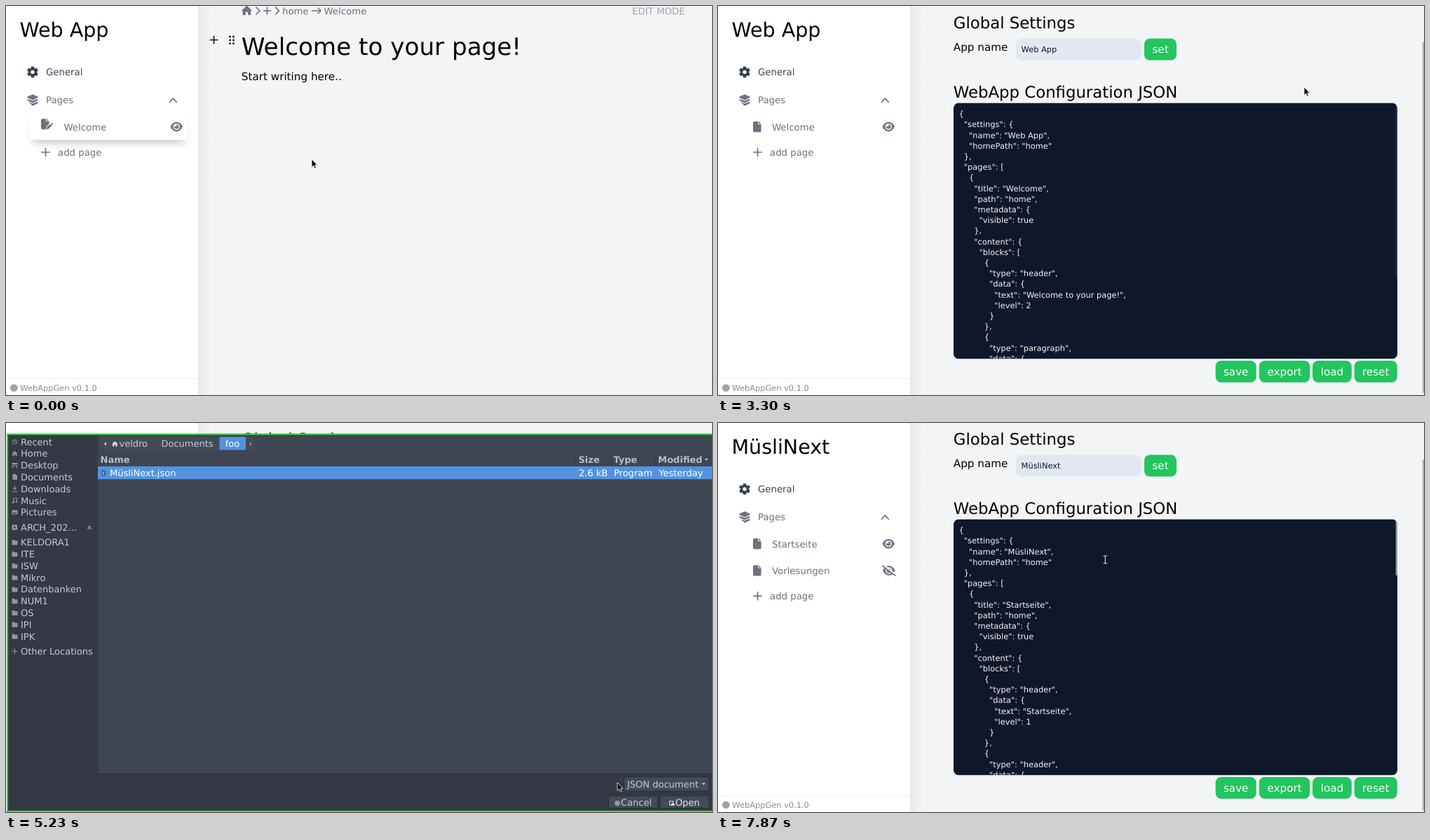
Animation, 1007 px wide and 556 px high, one loop 8000 ms. Source, as an HTML page:

```html
<!DOCTYPE html>
<html lang="en">
<head>
<meta charset="utf-8">
<title>Web App editor</title>
<style>
  html, body { margin: 0; width: 100%; height: 100%; overflow: hidden; background: #f3f4f6; }
  svg { display: block; }
  text { font-family: "DejaVu Sans", Verdana, sans-serif; text-rendering: geometricPrecision; white-space: pre; }
  .shade { filter: drop-shadow(0 6px 6px rgba(0, 0, 0, .2)); }
  .glow { filter: drop-shadow(0 4px 4px rgba(0, 0, 0, .18)); }
</style>
</head>
<body>
<svg id="stage" width="1007" height="556" viewBox="0 0 1007 556"></svg>
<script>
const LOOP = 8000;
const INK = '#374151', GRAY = '#6b7280', PALE = '#9ca3af', GREEN = '#22c55e', NIGHT = '#0f172a', BLUE = '#5294e2';

const text = (x, y, str, size = 13.3, fill = GRAY, extra = '') =>
  `<text x="${x}" y="${y}" font-size="${size}" fill="${fill}" ${extra}>${str}</text>`;
const rect = (x, y, w, h, fill, r = 0, extra = '') =>
  `<rect x="${x}" y="${y}" width="${w}" height="${h}" rx="${r}" fill="${fill}" ${extra}/>`;
const path = (d, fill = GRAY, extra = '') => `<path d="${d}" fill="${fill}" ${extra}/>`;
const line = (d, color = GRAY, width = 1.7) =>
  path(d, 'none', `stroke="${color}" stroke-width="${width}" stroke-linecap="round" stroke-linejoin="round"`);
const at = (x, y, body, extra = '') => `<g transform="translate(${x} ${y})" ${extra}>${body}</g>`;
const plus = (x, y, r, color, width) => line(`M${x - r} ${y}h${2 * r}M${x} ${y - r}v${2 * r}`, color, width);

// Icons
const tooth = a => rect(-2.4, -8, 4.8, 16, INK, 1.3, `transform="rotate(${a})"`);
const gear = [0, 60, 120].map(tooth).join('') +
  `<circle r="6" fill="${INK}"/><circle r="2.6" fill="#fff"/>`;
const layers = path('M8 0 15.6 3.5Q16.4 4 15.6 4.6L8 8.1.4 4.6Q-.4 4 .4 3.5Z') +
  [6.9, 10.8].map(y => path(`M2 ${y} 8 ${y + 2.4} 14 ${y} 15.6 ${y + .8}Q16.4 ${y + 1.3} 15.6 ${y + 1.8}L8 ${y + 5.2}.4 ${y + 1.8}Q-.4 ${y + 1.3} .4 ${y + .8}Z`)).join('');
const file = path('M2 0H7V3.9H11.6V13.4Q11.6 15.3 9.7 15.3H2Q0 15.3 0 13.4V2Q0 0 2 0Z') + path('M7.8 0 11.6 3.1H7.8Z');
const filePen = path('M2 0H7V3.9H11.6V7.2L7.6 11.2 6.8 15.3H2Q0 15.3 0 13.4V2Q0 0 2 0Z') + path('M7.8 0 11.6 3.1H7.8Z') +
  path('M8.4 12 13.2 7.2 15.6 9.6 10.8 14.4 7.8 15.2Z') + path('M13.9 6.5 15 5.5 17.4 7.8 16.3 8.9Z');
const eye = path('M0 7Q3 .2 8.7 .2T17.4 7Q14.4 13.8 8.7 13.8T0 7Z') +
  '<circle cx="8.7" cy="7" r="4.7" fill="#fff"/>' + `<circle cx="8.7" cy="7" r="3.2" fill="${GRAY}"/>` +
  '<circle cx="7.5" cy="5.7" r="1.3" fill="#fff"/>';
const eyeOff = at(.6, 0, eye) + line('M1.2 -1.2 19 13', '#fff', 2) + line('M.2 .2 18.2 14.3', GRAY, 1.6);
const house = (color, scale) => path('M8 0 16 7.2H14V14H9.8V9.5H6.2V14H2V7.2H0Z', color, `transform="scale(${scale})"`);

function sidebar(title, pages, active) {
  const rows = pages.map(([label, shown], i) => {
    const y = 173 + i * 38.3;
    const icon = active ? at(50, 165, filePen, 'id="pen"') : at(50, y - 8, file);
    return icon + text(active ? 82.5 : 77, y + 4.9, label) +
      at(234.5, y - 7.4, shown ? eye : eyeOff);
  }).join('');
  const addY = 209 + (pages.length - 1) * 38.3;
  return rect(274, 0, 22, 556, 'url(#edge)') + rect(0, 0, 274, 556, '#fff') +
    text(19.5, 44, title, 28.5, '#000') +
    at(38, 94.4, gear, 'class="gear"') + text(57, 99.2, 'General', 13.3, INK) +
    at(30, 126.3, layers) + text(57, 139.2, 'Pages') + line('M233.2 137.5 238.3 132.2 243.4 137.5') +
    (active ? rect(38, 158, 217, 32, '#fff', 3, 'class="shade"') + rect(34, 154, 225, 37.3, '#fff', 4) : '') +
    rows + plus(56.5, addY, 5.6) + text(74, addY + 4.9, 'add page') +
    rect(0, 532, 274, 1, '#eceef1') +
    `<circle cx="11.3" cy="545.8" r="5.4" fill="${PALE}"/>` + text(20.3, 550, 'WebAppGen v0.1.0', 11.4, '#858b97');
}

function welcomePage() {
  const dots = [0, 1, 2, 3, 4, 5].map(i => rect(318.2 + i % 2 * 5, 42.6 + (i >> 1) * 4.8, 2.6, 2.6, '#111', .6)).join('');
  return at(335.7, -.5, house(GRAY, .96)) + line('M357 2 362 6.8 357 11.6M384.5 2 389.5 6.8 384.5 11.6') +
    plus(372.5, 6.8, 4.8) + text(394, 11.7, 'home') + line('M436.5 6.8H449M445 2.8 449 6.8 445 10.8', GRAY, 1.5) +
    text(453.5, 11.7, 'Welcome') + text(893, 11.7, 'EDIT MODE', 13.3, PALE) +
    plus(296.5, 48.5, 5.3, '#111', 1.6) + dots +
    text(335.8, 70.3, 'Welcome to your page!', 34.2, '#000') + text(335.8, 106, 'Start writing here..', 15.2, '#000');
}

function config(name, title, heading, level, next) {
  const block = (type, data) => ({ type, data });
  return JSON.stringify({
    settings: { name, homePath: 'home' },
    pages: [{ title, path: 'home', metadata: { visible: true },
      content: { blocks: [block('header', { text: heading, level }), block(next, { text: '' })] } }]
  }, null, 2).split('\n').slice(0, 24);
}

const button = (x, y, w, label, cls = '') =>
  rect(x, y, w, 31, GREEN, 8, `class="${cls}"`) + text(x + w / 2, y + 20.8, label, 15.2, '#f9fafb', 'text-anchor="middle"');

function settingsPage(name, lines, thumb) {
  const code = lines.map((row, i) => {
    const body = row.trimStart();
    return text((343.6 + (row.length - body.length) * 3.625).toFixed(2), (219.2 + i * 15.2).toFixed(1), body, 11.4, '#f3f4f6');
  }).join('');
  return '<g class="scroll">' + text(335.8, 39.5, 'General', 34.2, '#000') +
    text(335.8, 93, 'Global Settings', 22.8, '#000') + text(335.8, 124.6, 'App name', 15.2, '#000') +
    rect(425, 107.6, 179, 30.8, '#e2e8f0', 8) + text(432.6, 127.2, name, 11.4, NIGHT) +
    button(608, 107.5, 46, 'set') + text(335.8, 192, 'WebApp Configuration JSON', 22.8, '#000') +
    '<g clip-path="url(#code)">' + rect(336, 199.5, 633, 366, NIGHT) + code +
    rect(966.8, 201, 2, thumb, '#a9b0bd', 1, 'class="thumb"') + '</g>' +
    button(709.7, 568, 58, 'save') + button(771.8, 568, 72.5, 'export') +
    button(848, 568, 55.8, 'load', 'load') + button(907.5, 568, 61.3, 'reset') + '</g>' +
    rect(1004.8, 0, 2.2, 502, '#b4b5b9', 1, 'class="bar"');
}

function dialog() {
  const SOFT = '#c3c9d4', DIM = '#8f96a3', PANEL = '#353945', BTN = '#444a58', EDGE = '#2b2e39';
  const t = (x, mid, str, fill = SOFT, extra) => text(x, mid + 4.7, str, 13, fill, extra);
  const bold = (x, str) => t(x, 52, str, '#b4bcc9', 'font-weight="bold"');
  const folder = y => path(`M8.5 ${y - 3.5}h3l1 1.2h4v6h-8z`, DIM);
  const thin = d => line(d, DIM, 1.2);
  const places = ['Recent', 'Home', 'Desktop', 'Documents', 'Downloads', 'Music', 'Pictures'];
  const drives = ['KELDORA1', 'ITE', 'ISW', 'Mikro', 'Datenbanken', 'NUM1', 'OS', 'IPI', 'IPK'];
  const icons = [
    '<circle cx="12.5" cy="27" r="3.4" fill="none" stroke="#8f96a3"/>' + thin('M12.5 25v2h1.5'),
    at(8.5, 40, house(DIM, .5)),
    rect(8.5, 57, 8, 2.2, DIM) + thin('M9 61h7M9.5 61v3M15.5 61v3'),
    path('M9.5 73h4l2.5 2.5v5.5h-6.5z', DIM),
    thin('M12.5 90v5M10.5 93.2l2 2 2-2M9 98h7'),
    thin('M10.8 113.5v-6h4.7v5') + `<circle cx="10" cy="113.6" r="1.4" fill="${DIM}"/><circle cx="14.7" cy="112.8" r="1.4" fill="${DIM}"/>`,
    rect(8.5, 124.5, 8, 6.5, DIM, 1) + path('M9.5 130l2-3 1.5 2 1-1 1.5 2z', PANEL)
  ].join('');
  return rect(2, 16, 1010, 539, '#404552') + rect(3, 17, 128, 485, PANEL) +
    places.map((p, i) => t(21, 27 + i * 16.77, p)).join('') + icons +
    rect(8.5, 145.5, 7.5, 7.5, DIM, 1) + rect(11, 148, 2.5, 2.5, PANEL) + t(21, 149.2, 'ARCH_202…') +
    path('M116 149.5l3-3.2 3 3.2zM116 150.5h6v1.2h-6z', DIM) +
    drives.map((d, i) => folder(170.5 + i * 16.8) + t(21, 170.5 + i * 16.8, d)).join('') +
    plus(12.5, 326.3, 3.6, DIM, 1.1) + t(21, 326.5, 'Other Locations') +
    rect(134.5, 20.5, 220, 18, BTN, 2) + rect(304.5, 20, 37.5, 18.5, BLUE, 1) +
    path('M143 27v5.5l-3.2-2.7z', SOFT) + at(151, 26, house('#d3dae3', .54)) +
    t(161.5, 29.6, 'veldro') + t(221.5, 29.6, 'Documents') + t(312.8, 29.6, 'foo', '#fff') + path('M347.5 27v5.5l3-2.7z', DIM) +
    bold(134.5, 'Name') + bold(816.5, 'Size') + bold(866.5, 'Type') + bold(930, 'Modified') +
    path('M996.5 51h5l-2.5 2.8z', SOFT) + [811, 862.5, 925.5].map(x => rect(x, 44, 1, 17, '#363b47')).join('') +
    rect(131, 62, 876, 18.3, BLUE) + path('M136.5 67h4l2 2v6.5h-6z', '#3569a8') + rect(138.5, 70, 1.2, 4, '#b8d3f3') +
    t(148, 71, 'MüsliNext.json', '#fff') + t(817, 71, '2.6 kB', '#fff') + t(867, 71, 'Program', '#fff') + t(931, 71, 'Yesterday', '#fff') +
    rect(3, 501, 1004, 53, PANEL) + rect(3, 501, 1004, 1, EDGE) + rect(3, 529, 1004, 1, '#2f333e') +
    rect(881.5, 506, 121, 20, BTN, 2, `stroke="${EDGE}"`) + t(886, 515.8, 'JSON document') + path('M992.3 514.5h5.4l-2.7 3z', SOFT) +
    rect(859.5, 533, 70, 17.5, BTN, 2, `stroke="${EDGE}"`) + t(877, 542, 'Cancel') +
    '<circle cx="872" cy="543.5" r="3.2" fill="none" stroke="#d3dae3"/><circle cx="872" cy="543.5" r="1.6" fill="#d3dae3"/>' +
    rect(933, 533, 70, 17.5, BTN, 2, `id="open" stroke="${EDGE}"`) + t(954.8, 542, 'Open', '#dfe4ec') +
    rect(946.5, 540.5, 5, 5.5, 'none', 0, 'stroke="#d3dae3"') + rect(949, 543.5, 4.5, 3.5, '#d3dae3') +
    rect(2, 16, 1020, 539, 'none', 0, 'stroke="#3fcf4a" stroke-width="2"');
}

const pointers = {
  arrow: path('M0 0V11.4L2.6 9 4.4 13 6.3 12.1 4.6 8.4H8Z', '#000', 'stroke="#fff" stroke-width=".8"'),
  hand: path('M0 .3Q1-.5 1.8.6L2.8 2.4 5 3.2Q6.4 4 6 6.6L5.6 10.5H1.4L.4 7.6Q-1 6.6 -.6 5.4L1.2 5.6Z', '#000', 'stroke="#fff" stroke-width=".4"'),
  beam: line('M-2.5 -5.5H-.8L0 -4.7 .8 -5.5H2.5M0 -4.7V4.7M-2.5 5.5H-.8L0 4.7 .8 5.5H2.5', '#d9dce3', 1.1)
};

const stage = document.getElementById('stage');
const group = (id, body) => `<g id="${id}">${body}</g>`;
stage.innerHTML =
  '<defs><linearGradient id="edge"><stop stop-opacity=".055"/><stop offset=".5" stop-opacity=".015"/><stop offset="1" stop-opacity="0"/></linearGradient>' +
  `<clipPath id="code">${rect(336, 199.5, 633, 366, '#000', 7.6)}</clipPath></defs>` + rect(0, 0, 1007, 556, '#f3f4f6') +
  group('welcome', welcomePage() + sidebar('Web App', [['Welcome', true]], true)) +
  group('settings', settingsPage('Web App', config('Web App', 'Welcome', 'Welcome to your page!', 2, 'paragraph'), 250) +
    sidebar('Web App', [['Welcome', true]])) +
  group('loaded', settingsPage('MüsliNext', config('MüsliNext', 'Startseite', 'Startseite', 1, 'header'), 79) +
    sidebar('MüsliNext', [['Startseite', true], ['Vorlesungen', false]])) +
  group('status', rect(-4, 535.5, 179.5, 26, '#94969b', 3, 'opacity=".93"') + text(4.5, 550.8, 'localhost:3000/#/general', 13, '#f6f6f7')) +
  group('dialog', dialog()) +
  Object.entries(pointers).map(([id, body]) => group(id, body)).join('');

const get = id => document.getElementById(id);
const all = cls => stage.querySelectorAll('.' + cls);
const show = (id, on) => get(id).setAttribute('display', on ? 'inline' : 'none');
const setAll = (cls, name, value) => all(cls).forEach(el => el.setAttribute(name, value));

// time, x, y, shape
const moves = [
  [0, 436, 219, 'arrow'], [1330, 330, 172, 'arrow'], [1530, 200, 120, 'arrow'], [1700, 132, 93, 'hand'],
  [2400, 330, 112, 'arrow'], [2530, 570, 152, 'arrow'], [2700, 780, 181, 'arrow'], [2830, 836, 116, 'arrow'],
  [3700, 838, 140, 'beam'], [3900, 845, 220, 'beam'], [4100, 855, 320, 'beam'], [4300, 862, 400, 'beam'],
  [4470, 868, 470, 'beam'], [4670, 872, 508, 'arrow'], [4870, 872, 514, 'arrow'],
  [5430, 790, 380, 'arrow'], [5630, 610, 136, 'arrow'], [5870, 720, 280, 'arrow'], [6100, 900, 440, 'arrow'],
  [6330, 998, 519, 'arrow'], [6530, 946, 534, 'arrow'], [6800, 975, 537, 'hand'], [6970, 981, 538, 'hand'],
  [7170, 981, 538, 'arrow'], [7500, 840, 420, 'beam'], [7670, 661, 273, 'beam'], [7870, 552.3, 195.3, 'beam']
];
const scrolls = [[0, 0], [3130, 30], [3300, 61], [3470, 62]];
const current = (table, t) => table.findLast(row => row[0] <= t);

// Slow at the top, fast at the bottom
const bounce = t => -3.8 * Math.pow(Math.abs(Math.sin(Math.PI * (Math.min(t, 900) / 1000 + .5))), .6);

function draw(t) {
  const between = (a, b) => t >= a && t < b;
  show('welcome', t < 1870);
  show('settings', between(1870, 7170));
  show('loaded', t >= 7170);
  show('status', between(1700, 2230));
  show('dialog', between(5230, 7170));
  get('pen').setAttribute('transform', `translate(50 ${165 + bounce(t)})`);
  setAll('gear', 'transform', `translate(38 94.4) scale(${between(1700, 2400) ? 1.17 : 1})`);

  const scroll = current(scrolls, t)[1];
  setAll('scroll', 'transform', `translate(0 ${-scroll})`);
  setAll('bar', 'y', scroll * .84);
  setAll('thumb', 'opacity', between(2400, 3700) ? .2 : 1);

  const hover = between(4670, 5230);
  all('load').forEach(el => {
    el.setAttribute('fill', hover ? '#4ade80' : GREEN);
    el.classList.toggle('glow', hover);
  });
  get('open').setAttribute('fill', t >= 6800 ? BLUE : '#444a58');

  const [, x, y, shape] = current(moves, t);
  for (const id in pointers) show(id, id === shape);
  get(shape).setAttribute('transform', `translate(${x} ${y})`);
}

const start = performance.now();
function tick() {
  draw((performance.now() - start) % LOOP);
  requestAnimationFrame(tick);
}
tick();
</script>
</body>
</html>
```
